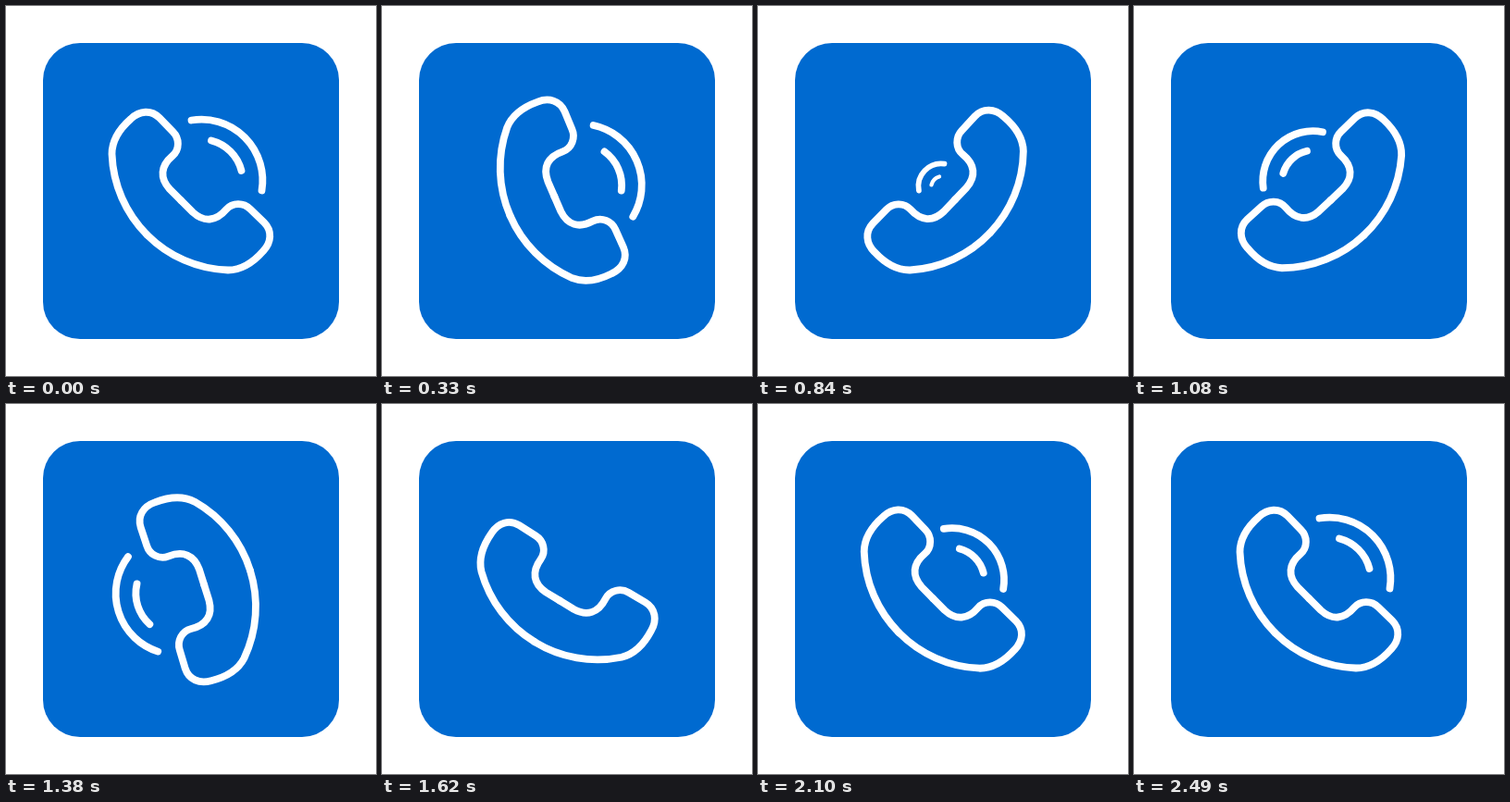
Recreate the animation shown at these times as an HTML page. Size 400 by 400 pixels, loop 2670 ms.

```html
<!DOCTYPE html>
<html lang="en">
<head>
<meta charset="utf-8">
<title>Ringing phone</title>
<style>
  html, body { margin: 0; width: 100%; height: 100%; overflow: hidden; background: #fff; }
  svg { display: block; width: 100vw; height: 100vh; }
</style>
</head>
<body>
<svg viewBox="0 0 400 400">
  <rect x="40" y="40" width="320" height="320" rx="40" fill="#006ad0"/>
  <g id="phone" fill="none" stroke="#fff" stroke-width="7.8" stroke-linecap="round" stroke-linejoin="round">
    <path id="half" d="M152.6 247.4A130 130 0 0 1 114.5 160C114.5 146 122.5 133 135 122C144.5 113 157 112 166 121L180.5 136C187.5 143 188 155 180 162C167 173 166 186 177 198L189.5 210.5"/>
    <use href="#half" transform="matrix(0 -1 -1 0 400 400)"/>
    <path class="wave" d="M200.5 123.5A66 66 0 0 1 276.5 199.5"/>
    <path class="wave" d="M222 145.5A45 45 0 0 1 254.5 178"/>
  </g>
</svg>
<script>
const LOOP = 2670, STEP = 30, STROKE = 7.8;
const TURN = 272, FORTH = 205, BACK = 1200;
const SWING = 470, OVERSHOOT = 0.055;
const phone = document.getElementById('phone');
const waves = document.querySelectorAll('.wave');

const easeInOut = u => u < 0.5 ? 4 * u ** 3 : 1 - 4 * (1 - u) ** 3;
const easeOut = u => 1 - (1 - u) ** 2;
const ramp = (ms, from, duration, ease = easeInOut) =>
  ease(Math.min(1, Math.max(0, (ms - from) / duration)));

// Swing from 0 past 1, then a damped spring back to 1
function swing(ms) {
  const rest = ms - SWING;
  return rest < 0
    ? (1 + OVERSHOOT) * ramp(ms, 0, SWING)
    : 1 + OVERSHOOT * Math.exp(-rest / 115) * Math.cos(Math.PI * rest / 150);
}

// How far a wave is drawn in during one swing
const dip = ms => ramp(ms, 190, 150) - ramp(ms, 500, 650, easeOut);

function draw(now) {
  const t = Math.floor((now % LOOP) / STEP) * STEP;
  const angle = TURN * (swing(t - FORTH) - swing(t - BACK));
  const drift = ramp(t, 650, 250) - ramp(t, BACK, 200);
  phone.setAttribute('transform',
    `translate(${2.5 * drift} ${-drift}) rotate(${angle} 200 200)`);
  waves.forEach((wave, i) => {
    const ms = t - 40 * i;
    const scale = 1 - dip(ms - FORTH) - dip(ms - BACK);
    wave.setAttribute('transform', `translate(200 200) scale(${scale}) translate(-200 -200)`);
    wave.setAttribute('stroke-width', STROKE / Math.max(scale, 0.5));
    wave.setAttribute('visibility', scale > 0.01 ? 'visible' : 'hidden');
  });
}

const start = performance.now();
function tick() {
  draw(performance.now() - start);
  requestAnimationFrame(tick);
}
tick();
</script>
</body>
</html>
```
